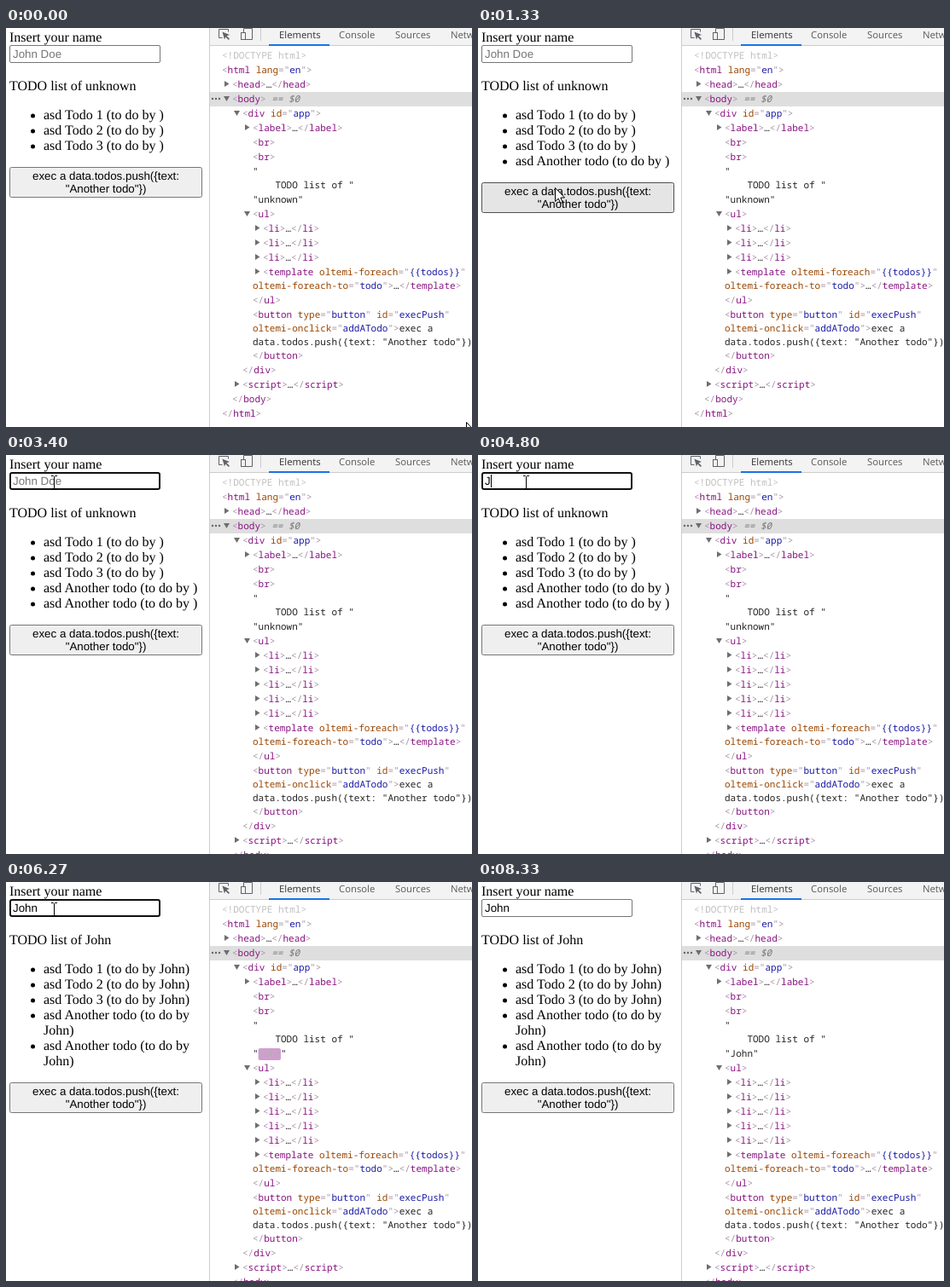
Write an HTML page that moves like this. It is 546 px wide and 468 px high and loops after 8.39 s.

```html
<!DOCTYPE html>
<html lang="en">
<head>
<meta charset="utf-8">
<style>
  html, body { margin: 0; width: 100%; height: 100%; overflow: hidden; background: #fff; }
  svg { display: block; }
  text { white-space: pre; text-rendering: geometricPrecision; }
  .page { font: 16px "Liberation Serif", "Times New Roman", serif; }
  .control { font: 13.333px "Liberation Sans", Arial, sans-serif; }
  .tab { font: 11.3px "Open Sans", sans-serif; fill: #5a5a5a; }
  .tip { font: 12px "Open Sans", sans-serif; }
  .code { font: 11px "Noto Sans Mono", monospace; fill: #222; }
  .bracket { fill: #a894a6; }
  .name { fill: #881280; }
  .attr { fill: #994500; }
  .value { fill: #1a1aa6; }
</style>
</head>
<body>
<svg id="stage" width="546" height="468" viewBox="0 0 546 468"></svg>
<script>
const LOOP = 8390;
const FIRST_ROW = 24, ROW_HEIGHT = 17, WRAPPED_HEIGHT = 16, CHAR = 6.6;
const FOCUS = 2740, BLUR = 8330, BLINK = 530;
const KEYS = [4800, 5100, 5370, 5670];
const PRESSES = [1270, 1880], PUSH_DELAY = 60;
const NODE_INSERTS = [1470, 2000];
const NAME_BOUND = 130, NAME_INSPECTED = 200;

// Pointer way points: time, x, y
const PATH = [
  [0, 539, 462], [70, 539, 462], [270, 213, 83], [870, 87, 167], [1000, 90, 187],
  [1960, 90, 187], [2270, 56, 43], [2400, 56, 35], [2740, 56, 32],
  [6880, 56, 32], [7330, 110, 312], [7800, 150, 470], [LOOP, 150, 470]
];

const stage = document.getElementById('stage');
const lerp = (a, b, k) => a + (b - a) * k;
const mix = (a, b, k) => a.map((v, i) => Math.round(lerp(v, b[i], k)));
const escape = s => s.replace(/&/g, '&amp;').replace(/</g, '&lt;');
const text = (cls, x, y, s, extra = '') => `<text class="${cls}" x="${x}" y="${y}" ${extra}>${escape(s)}</text>`;
const rect = (x, y, w, h, fill, extra = '') =>
  `<rect x="${x}" y="${y}" width="${w}" height="${h}" fill="${fill}" ${extra}/>`;
const path = (d, fill, extra = '') => `<path d="${d}" fill="${fill}" ${extra}/>`;
const span = (cls, s) => `<tspan class="${cls}">${escape(s)}</tspan>`;
const passed = (times, t, delay = 0) => times.filter(time => t >= time + delay).length;
const isInside = ({ x, y }, left, top, w, h) => x >= left && x < left + w && y >= top && y < top + h;
const isOverInput = pointer => isInside(pointer, 4, 20, 177, 21);

// The CSS "ease" curve, solved by bisection
function ease(x) {
  const bezier = (a, b, s) => 3 * a * s * (1 - s) ** 2 + 3 * b * s * s * (1 - s) + s ** 3;
  let low = 0, high = 1;
  for (let i = 0; i < 16; i++) {
    const mid = (low + high) / 2;
    if (bezier(.25, .25, mid) < x) low = mid; else high = mid;
  }
  return bezier(.1, 1, low);
}

// Highlight of a changed node: strong purple, then pale, then gone
function flash(start, t, ink) {
  const p = (t - start) / 1400;
  if (!(p >= 0 && p < 1)) return null;
  const k = Math.min(p / .8, 1);
  return {
    fill: `rgb(${mix([158, 54, 153], [245, 219, 244], ease(k))})`,
    ink: `rgb(${mix([255, 255, 255], ink, k)})`,
    opacity: p < .8 ? 1 : 1 - ease((p - .8) / .2)
  };
}

function pointerAt(t) {
  const i = PATH.findIndex(point => point[0] > t);
  const [t0, x0, y0] = PATH[i - 1], [t1, x1, y1] = PATH[i];
  const k = (t - t0) / (t1 - t0);
  return { x: lerp(x0, x1, k), y: lerp(y0, y1, k) };
}

function highlightCode(source) {
  const token = /(<\/?)(\w+)|([\w-]+)(=")([^"]*)(")|(>)|(.)/g;
  return source.replace(token, (all, open, name, attr, equals, value, quote, close) => {
    if (open) return span('bracket', open) + span('name', name);
    if (attr) return span('attr', attr) + span('bracket', equals) + span('value', value) + span('bracket', quote);
    return close ? span('bracket', close) : escape(all);
  });
}

function drawPage(t, pointer) {
  const name = 'John'.slice(0, passed(KEYS, t, NAME_BOUND));
  const pushed = passed(PRESSES, t, PUSH_DELAY);
  let out = text('page', 4, 16, 'Insert your name') + drawInput(t, pointer) +
    text('page', 4, 73, 'TODO list of ' + (name || 'unknown'));

  let y = 107;
  for (let i = 0; i < 3 + pushed; i++) {
    const isExtra = i >= 3;
    const title = isExtra ? 'Another todo' : 'Todo ' + (i + 1);
    const wraps = isExtra && name;
    out += `<circle cx="31.5" cy="${y - 4}" r="2.5"/>` +
      text('page', 44, y, `asd ${title} (to do by ${wraps ? '' : name + ')'}`);
    if (wraps) out += text('page', 44, y += 18, name + ')');
    y += 18;
  }
  return out + drawButton(t, y + 2, pointer);
}

function drawInput(t, pointer) {
  const typed = passed(KEYS, t);
  const focused = t >= FOCUS && t < BLUR;
  let out = focused
    ? rect(5, 21, 175, 19, '#fff', 'rx="2" stroke="#101010" stroke-width="2"')
    : rect(4.5, 20.5, 176, 20, '#fff', `rx="1.5" stroke="${isOverInput(pointer) ? '#4f4f4f' : '#767676'}"`);
  out += typed
    ? text('control', 8, 35, 'John'.slice(0, typed))
    : text('control', 8, 35, 'John Doe', 'fill="#757575"');

  const caretStart = typed ? KEYS[typed - 1] : FOCUS;
  if (focused && Math.floor((t - caretStart) / BLINK) % 2 === 0) {
    const caretX = 8 + (typed && Math.round(7.4 * typed - .7));
    out += rect(caretX, 23, 1, 15, '#000');
  }
  return out;
}

function drawButton(t, y, pointer) {
  const hover = isInside(pointer, 4, y, 226, 36);
  const pressed = PRESSES.some(time => t >= time && t < time + PUSH_DELAY);
  const [fill, stroke] = pressed ? ['#f5f5f5', '#8d8d8d'] : hover ? ['#e5e5e5', '#4f4f4f'] : ['#efefef', '#767676'];
  const centered = 'text-anchor="middle"';
  return rect(4.5, y + .5, 225, 35, fill, `rx="2" stroke="${stroke}"`) +
    text('control', 117, y + 15, 'exec a data.todos.push({text:', centered) +
    text('control', 117, y + 30, '"Another todo"})', centered);
}

function drawToolbar() {
  const icon = 'stroke="#5f6368"';
  return rect(239, 0, 307, 20, '#f3f3f3') + rect(239, 20, 307, 1, '#ccc') +
    path('M253.5 11.5H249.5V1.5H260.5V4.5', 'none', icon) +
    path('M253.5 4.5L262 8L258.5 9.3L262 12.8L260.8 14L257.3 10.5L256 13.5Z', '#5f6368') +
    path('M278.5 5V.5H288.5V13.5H281', 'none', icon) +
    rect(275.5, 5.5, 5, 8, '#f3f3f3', icon) +
    rect(298, 0, 1, 15, '#ccc') + rect(308, 19, 71, 2, '#1a73e8') +
    text('tab', 320, 12, 'Elements', 'style="fill:#333"') + text('tab', 390, 12, 'Console') +
    text('tab', 456, 12, 'Sources') + text('tab', 521, 12, 'Network');
}

// Rows of the element tree: x, source, kind, highlight start
function treeRows(t) {
  const typed = passed(KEYS, t, NAME_INSPECTED);
  const name = 'John'.slice(0, typed) || 'unknown';
  const items = [0, 0, 0, ...NODE_INSERTS].filter(time => t >= time).map(time =>
    [301, '<li>…</li>', 'closed', typed ? KEYS[0] + NAME_INSPECTED : time || undefined]);
  return [
    [253, '<!DOCTYPE html>'],
    [253, '<html lang="en">'],
    [265, '<head>…</head>', 'closed'],
    [265, '<body>', 'open'],
    [277, '<div id="app">', 'open'],
    [289, '<label>…</label>', 'closed'],
    [289, '<br>'],
    [289, '<br>'],
    [289, '"'],
    [289, '    TODO list of "', 'wrapped'],
    [289, `"${name}"`, '', typed ? KEYS[typed - 1] + NAME_INSPECTED : undefined],
    [289, '<ul>', 'open'],
    ...items,
    [301, '<template oltemi-foreach="{{todos}}"', 'closed'],
    [289, 'oltemi-foreach-to="todo">…</template>', 'wrapped'],
    [289, '</ul>'],
    [289, '<button type="button" id="execPush"'],
    [289, 'oltemi-onclick="addATodo">exec a', 'wrapped'],
    [289, 'data.todos.push({text: "Another todo"})', 'wrapped'],
    [289, '</button>', 'wrapped'],
    [277, '</div>'],
    [277, '<script>…<\/script>', 'closed'],
    [265, '</body>'],
    [253, '</html>']
  ];
}

function drawRow([x, source, kind, flashStart], top, t, hovered) {
  const baseline = top + 12, mid = top + 8;
  const isBody = source === '<body>', isItem = source.startsWith('<li');
  let out = '', content = highlightCode(source);

  if (isBody) {
    out += rect(239, top, 307, ROW_HEIGHT, '#dedede');
    for (const dotX of [242, 246, 250]) out += `<circle cx="${dotX}" cy="${mid}" r="1.2" fill="#666"/>`;
    content += '<tspan fill="#777" font-style="italic"> == $0</tspan>';
  } else if (hovered) {
    out += rect(244, top, 310, ROW_HEIGHT, '#ebf1fb', 'rx="3"');
  }
  if (source.startsWith('<!')) content = `<tspan fill="#c0c0c0">${escape(source)}</tspan>`;

  const glow = flash(flashStart, t, isItem ? [136, 18, 128] : [34, 34, 34]);
  if (glow) {
    const length = isItem ? 2 : source.length - 2;
    out += rect(x + CHAR, baseline - 10, length * CHAR, 14, glow.fill, `rx="2" opacity="${glow.opacity}"`);
    const ink = `<tspan style="fill:${glow.ink}"`;
    content = isItem
      ? content.replace('<tspan class="name"', ink + ' class="name"')
      : `"${ink}>${source.slice(1, -1)}</tspan>"`;
  }

  if (kind === 'open') out += path(`M${x - 10} ${mid - 3}h7l-3.5 6z`, '#6e6e6e');
  if (kind === 'closed') out += path(`M${x - 9} ${mid - 4}v7l5.5 -3.5z`, '#6e6e6e');
  return out + `<text class="code" x="${x}" y="${baseline}">${content}</text>`;
}

function drawInspector(t, pointer, lingering) {
  let out = rect(238, 0, 308, 468, '#fff') + drawToolbar();
  let top = FIRST_ROW - ROW_HEIGHT;
  for (const row of treeRows(t)) {
    top += row[2] === 'wrapped' ? WRAPPED_HEIGHT : ROW_HEIGHT;
    const hovered = isInside(pointer, 239, top, 307, ROW_HEIGHT) ||
      lingering && pointer.x < 239 && row[1].startsWith('<label');
    out += drawRow(row, top, t, hovered);
  }
  return out + rect(238, 0, 1, 468, '#ccc');
}

function drawTooltip() {
  return rect(-4, 10, 102, 30, '#fff', 'rx="2" style="filter:drop-shadow(0 1px 3px #0007)"') +
    text('tip', 6, 30, 'br', 'fill="#881280" style="font-weight:700"') +
    text('tip', 55, 30, '0 × 17', 'fill="#808080"');
}

function drawPointer(pointer) {
  const overInput = isOverInput(pointer);
  const shape = overInput
    ? path('M-3.5 -8H-1L0 -7L1 -8H3.5M0 -7V7M-3.5 8H-1L0 7L1 8H3.5', 'none', 'stroke="#000"')
    : path('M.5 .5V16.5L4.2 13L6.8 18.5L9.2 17.5L6.8 12H11.5Z', '#fff', 'stroke="#000"');
  const offset = overInput ? .5 : 0;
  return `<g transform="translate(${Math.round(pointer.x) + offset} ${Math.round(pointer.y) + offset})">${shape}</g>`;
}

function render() {
  const t = performance.now() % LOOP;
  const pointer = pointerAt(t);
  const lingering = t >= 200 && t < 400;
  stage.innerHTML = drawPage(t, pointer) + (lingering ? drawTooltip() : '') +
    drawInspector(t, pointer, lingering) + drawPointer(pointer);
  requestAnimationFrame(render);
}
render();
</script>
</body>
</html>
```
